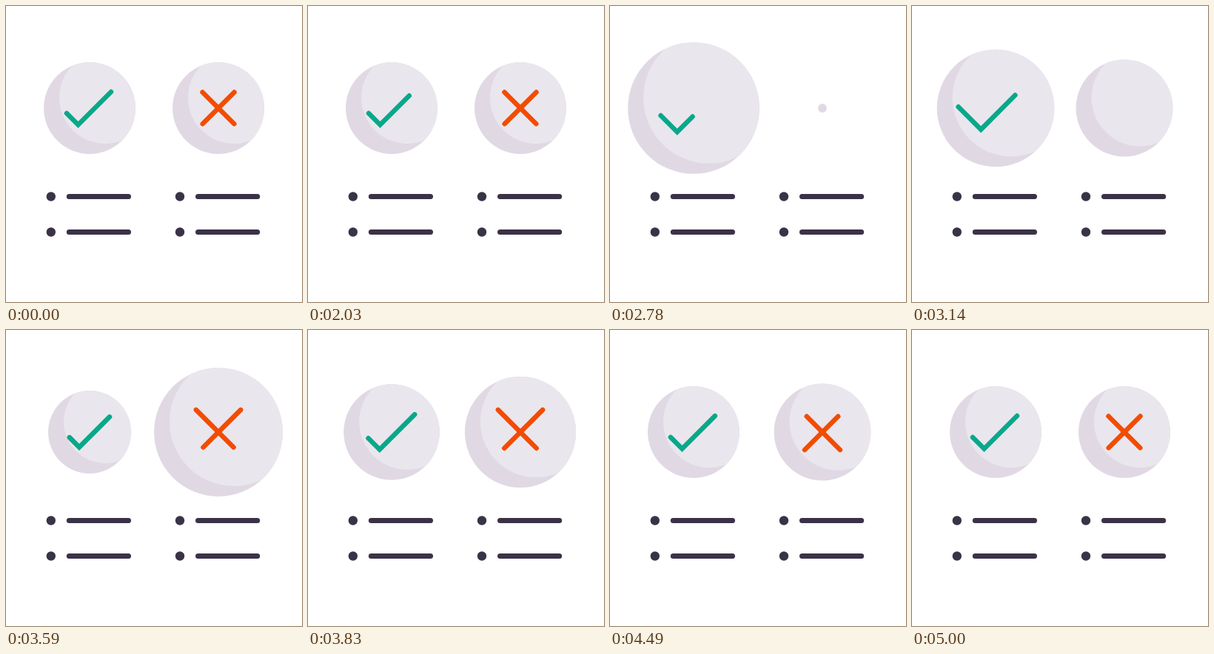
Recreate the animation shown at these times as an HTML page with a canvas. Size 400 px wide and 400 px high, loop 5.03 s.

```html
<!DOCTYPE html>
<html>
<head>
<meta charset="utf-8">
<style>
html, body { margin: 0; height: 100%; overflow: hidden; background: #fff; }
canvas { display: block; width: 400px; height: 400px; }
</style>
</head>
<body>
<canvas id="stage" width="400" height="400"></canvas>
<script>
const ctx = document.getElementById('stage').getContext('2d');
const LOOP = 5030, HOLD = 2030, STEP = 30, REST = 62;

const smooth = s => s * s * (3 - 2 * s);
const out = s => 1 - (1 - s) ** 2.75;

// Each key is [time, value, easing towards it]
function track(keys, t) {
  if (t <= keys[0][0]) return keys[0][1];
  for (let i = 1; i < keys.length; i++) {
    const [t0, v0] = keys[i - 1], [t1, v1, ease = smooth] = keys[i];
    if (t < t1) return v0 + (v1 - v0) * ease((t - t0) / (t1 - t0));
  }
  return keys[keys.length - 1][1];
}

const tick = {
  x: 113,
  radius: [[2060, 62], [2240, 0], [2965, 91, out], [3440, 53], [3920, 66], [4420, 62]],
  drawn: [[2000, 1], [2165, 0], [2640, 0], [2920, 1]],
  shift: [[2920, 0], [3200, 9.5], [3650, -1.4], [4130, .35], [4750, 0]],
  mark: drawTick
};
const cross = {
  x: 287,
  radius: [[2640, 62], [2813, 0], [3635, 87, out], [4115, 54], [4595, 67], [5000, 62]],
  drawn: [[2510, 1], [2690, 0], [3380, 0], [3660, 1]],
  shift: [[3660, 0], [4090, 9.8], [4480, -1.4], [4800, .4], [5000, 0]],
  mark: drawCross
};

function disc(x, y, r, color) {
  ctx.fillStyle = color;
  ctx.beginPath();
  ctx.arc(x, y, r, 0, 7);
  ctx.fill();
}

function line(points, color, width = 6.5) {
  ctx.strokeStyle = color;
  ctx.lineWidth = width;
  ctx.beginPath();
  points.forEach(p => ctx.lineTo(...p));
  ctx.stroke();
}

function drawTick(x, scale, drawn, shift) {
  const start = -15.5 - shift, end = start + 60 * drawn;
  const at = p => [x + (p - 15.5) * scale, 138 + (22.5 - Math.abs(p)) * scale];
  line(end > 0 ? [at(start), at(0), at(end)] : [at(start), at(end)], '#08a88a');
}

function drawCross(x, scale, drawn, shift) {
  const start = (-21.5 - shift) * scale, end = start + 42.8 * drawn * scale;
  for (const side of [1, -1])
    line([start, end].map(p => [x + side * p, 138 + p]), '#f24c00');
}

function badge({ x, radius, drawn, shift, mark }, t) {
  const r = track(radius, t), d = track(drawn, t);
  disc(x, 138, r, '#e0d9e4');
  ctx.save();
  ctx.beginPath();
  ctx.arc(x, 138, r, 0, 7);
  ctx.clip();
  disc(x + 21, 124, r, '#eae6ed');
  ctx.restore();
  if (d > 0) mark(x, r / REST, d, track(shift, t));
}

function list(x) {
  for (const y of [257.5, 305.5]) {
    disc(x, y, 6.2, '#3a3347');
    line([[x + 24.5, y], [x + 104.7, y]], '#3a3347', 7);
  }
}

function frame(now) {
  const time = now % LOOP;
  const t = time < HOLD ? 0 : HOLD + STEP * Math.floor((time - HOLD) / STEP);
  ctx.fillStyle = '#fff';
  ctx.fillRect(0, 0, 400, 400);
  ctx.lineCap = ctx.lineJoin = 'round';
  ctx.lineJoin = 'miter';
  badge(tick, t);
  badge(cross, t);
  list(60.8);
  list(235);
  requestAnimationFrame(frame);
}
requestAnimationFrame(frame);
</script>
</body>
</html>
```
